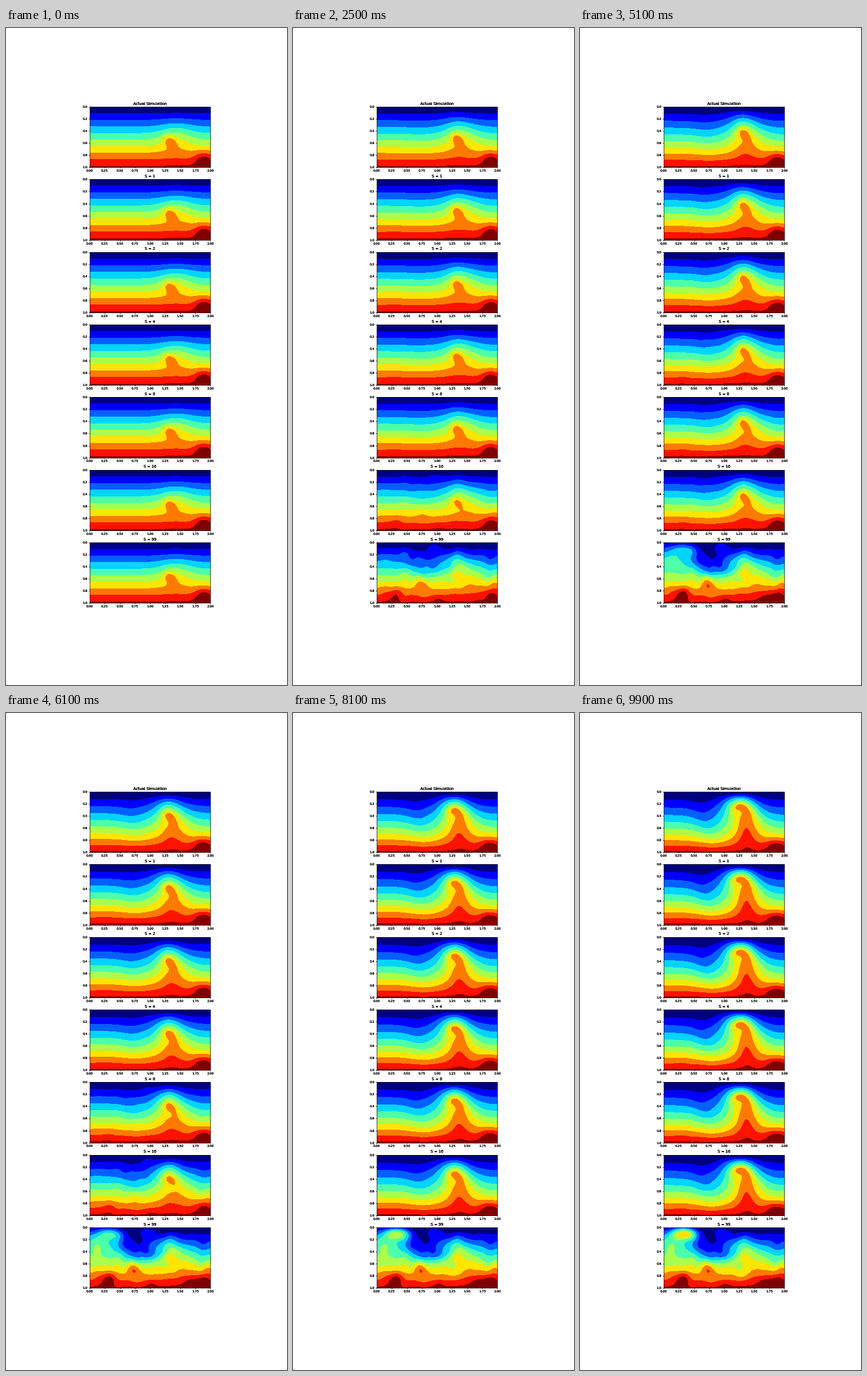
Recreate the animation shown at these times as a matplotlib script. Size 490 by 1143 pixels, loop 10000 ms.

```python
import numpy as np
import matplotlib.pyplot as plt
from matplotlib import colormaps
from matplotlib.animation import FuncAnimation
from matplotlib.collections import LineCollection

W, H, DPI, FRAMES = 490, 1143, 40, 100
SIDE = H * 0.755 / 8.2                 # panel height in pixels
PITCH = 1.2 * SIDE
LEFT, TOP = W * 0.5125 - SIDE, H * 0.12
STEPS = [1, 2, 4, 8, 16, 99]
PALETTE = (colormaps["jet"](np.arange(10) / 9) * 255).astype(np.uint8)

COLS, ROWS, X0, Y0 = 211, 106, 146, 137
GX, GY = np.meshgrid((np.arange(COLS) + 0.5) / SIDE,
                     (np.arange(ROWS) + 0.5) / SIDE)


def bump(x, y, cx, cy, rx, ry):
    return np.exp(-((x - cx) / rx) ** 2 - ((y - cy) / ry) ** 2)


# --- steady cell flow: sinking near x = 0.72, rising near x = 1.32
CELLS = [(0.11, 0.72, 0.22), (-0.44, 1.32, 0.20)]


def cell_sum(x):
    """Integral over x of the vertical speeds of both cells."""
    return sum(a * w * (np.tanh((x - c) / w) + np.tanh(c / w))
               for a, c, w in CELLS)


RETURN = -cell_sum(2) / 2              # uniform counterflow closes the box


def velocity(x, y):
    down = RETURN + sum(a / np.cosh((x - c) / w) ** 2 for a, c, w in CELLS)
    u = -np.pi * np.cos(np.pi * y) * (cell_sum(x) + RETURN * x)
    return u, down * np.sin(np.pi * y)


def start_heat(x, y):
    """Layered heat with a broad swell, a plume head and a hot corner."""
    lean = 0.3 * (y - 0.57)
    return (9.22 * y + 1.15 * bump(x, y, 1.43, 0.50, 0.27, 0.25)
            + 1.6 * bump(x - lean, y, 1.325, 0.572, 0.10, 0.096)
            + 1.6 * bump(x, y, 1.895, 0.875, 0.152, 0.143))


def carry_heat():
    """Trace every pixel back to its starting point, frame by frame."""
    x, y, fields = GX.copy(), GY.copy(), []
    ease = (np.arange(FRAMES) / (FRAMES - 1)) ** 1.5
    for dt in np.diff(ease, prepend=0):
        u, v = velocity(x, y)
        u, v = velocity(x - u * dt / 2, y - v * dt / 2)
        x, y = x - u * dt, y - v * dt
        fields.append(start_heat(x, y))
    return fields, ease


ACTUAL, EASE = carry_heat()

# --- forecast error: x, y, radii, strength, first and last step of growth
DRIFTS = [
    (0.34, 0.10, 0.20, 0.10, 5.0, 30, 95),
    (0.11, 0.24, 0.32, 0.23, 2.3, 22, 60),
    (0.76, 0.34, 0.21, 0.19, -2.0, 5, 45),
    (0.95, 0.07, 0.11, 0.08, 1.3, 0, 40),
    (1.03, 0.46, 0.15, 0.11, -1.2, 10, 60),
    (0.31, 0.86, 0.13, 0.13, 1.5, 0, 50),
    (0.71, 0.65, 0.09, 0.11, 1.0, 10, 50),
    (1.28, 0.78, 0.10, 0.11, -0.9, 55, 95),
    (1.69, 0.89, 0.19, 0.11, 1.0, 15, 60),
]
SHAPES = np.array([bump(GX, GY, *d[:4]) for d in DRIFTS])
GAIN, BEGIN, END = np.array(DRIFTS)[:, 4:].T

rng = np.random.default_rng(4)
RIPPLE = sum(rng.uniform(-0.7, 0.7)
             * bump(GX, GY, rng.uniform(0, 2), rng.uniform(0.1, 0.95), 0.09, 0.1)
             for _ in range(60))


def forecast(n, step):
    age = (n - 1) % step + 1 if n else 0      # steps since the last reset
    young = min(age / 25, 1)
    lag = int(max(1 + 0.2 * age, age - 28))
    past = max(0, n - lag)
    s = EASE[past]
    neck = bump(GX, GY, 1.35 + 0.03 * s, 0.62 - 0.24 * s, 0.11, 0.11)
    grown = GAIN * np.clip((age - BEGIN) / (END - BEGIN), 0, 1)
    return (ACTUAL[past] + np.tensordot(grown, SHAPES, 1)
            + young * (RIPPLE - 0.9 * neck))


# --- drawing
SPAN = round(6 * PITCH) + ROWS


def picture(n):
    img = np.zeros((SPAN, COLS, 4), np.uint8)
    fields = [ACTUAL[n]] + [forecast(n, s) for s in STEPS]
    for i, f in enumerate(fields):
        a = round(TOP + i * PITCH) - Y0
        img[a:a + ROWS] = PALETTE[np.clip(np.floor(f), 0, 9).astype(int)][:SPAN - a]
    return img


fig = plt.figure(figsize=(W / DPI, H / DPI), dpi=DPI, facecolor="white")
image = fig.figimage(picture(0), X0, H - Y0 - SPAN, origin="upper", zorder=-1)
ax = fig.add_axes([0, 0, 1, 1], zorder=1)
ax.set(xlim=(0, W), ylim=(H, 0))
ax.axis("off")


def label(x, y, text, size, ha, va):
    for _ in range(3):      # repeated for a darker print
        ax.text(x, y, text, size=size, ha=ha, va=va, family="DejaVu Sans")


lines = []
tick, gap = 3.5 * DPI / 72, 7 * DPI / 72
right = LEFT + 2 * SIDE
for i in range(7):
    top, low = TOP + i * PITCH, TOP + i * PITCH + SIDE
    lines += [[(LEFT, top), (right, top)], [(LEFT, low), (right, low)],
              [(LEFT, top), (LEFT, low)], [(right, top), (right, low)]]
    for j in range(9):
        x = LEFT + j * SIDE / 4
        lines.append([(x, low), (x, low + tick)])
        label(x, low + gap, f"{j / 4:.2f}", 10, "center", "top")
    for j in range(6):
        y = top + j * SIDE / 5
        lines.append([(LEFT - tick, y), (LEFT, y)])
        label(LEFT - gap, y, f"{j / 5:.1f}", 10, "right", "center_baseline")
    title = f"S = {STEPS[i - 1]}" if i else "Actual Simulation"
    label(LEFT + SIDE, top - 6 * DPI / 72, title, 12, "center", "baseline")
ax.add_collection(LineCollection(lines, colors="black", linewidths=1.3))


def update(n):
    image.set_data(picture(n))
    return [image]


anim = FuncAnimation(fig, update, frames=FRAMES, interval=100, repeat=True,
                     repeat_delay=0, blit=False)
plt.show()
```
